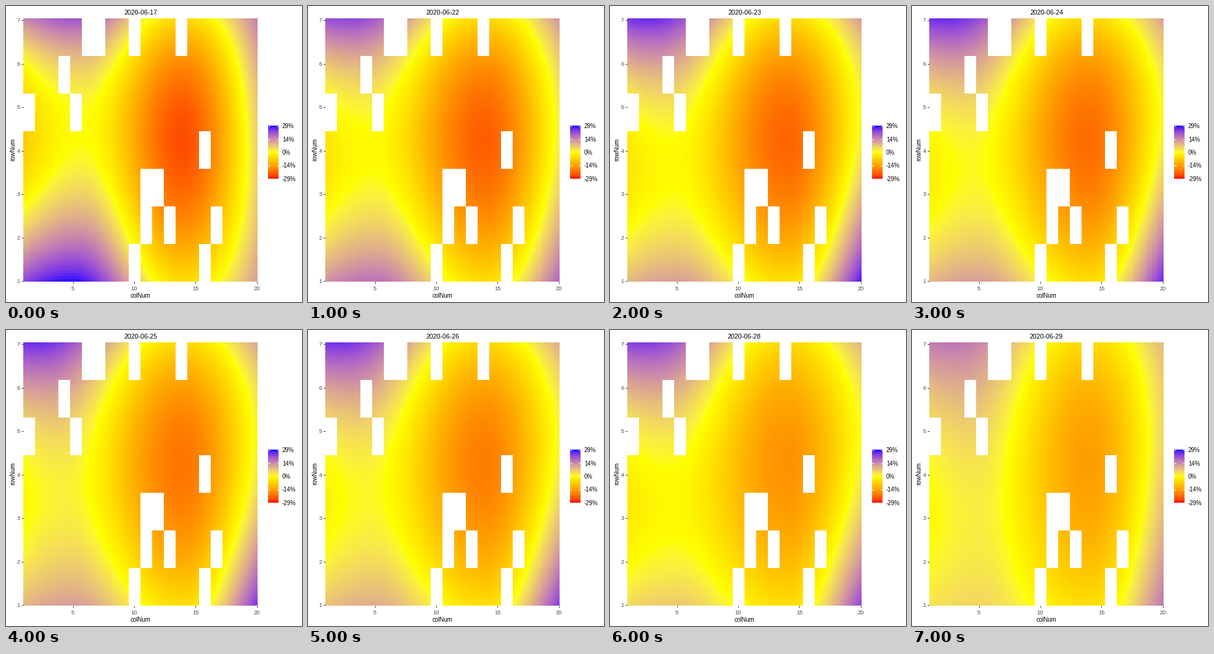
These frames come from a looping animation (480 by 480 pixels, 8 s). A matplotlib script:

```python
import numpy as np
import matplotlib.pyplot as plt
from matplotlib.animation import FuncAnimation
from matplotlib.patches import Rectangle

plt.rcParams["font.family"] = ["Liberation Sans", "DejaVu Sans"]

SIZE, DPI = 480, 72
LEFT, RIGHT, TOP, BOTTOM = 28, 408, 20, 447
LIMIT = 29.0
CELLS = 100
TROUGH_COL = 13.9

DAYS = [17, 22, 23, 24, 25, 26, 28, 29]

# Heights in percent on the days that steer the terrain: the western ridge at
# the north edge, its saddle and the south edge, then the eastern edge.
KEY_DAYS = [17, 22, 23, 25, 28, 29]
KEYS = {
    "north": [21, 23, 26, 26, 24, 17],
    "saddle": [0, -0.5, 0, 2.5, 0.3, 3.3],
    "south": [29, 17.5, 11.8, 12, 6.5, 5],
    "east": [6, 2.5, 2.5, 2.5, 1.8, 6],
    "southeast": [12, 19.5, 28, 25, 23, 17],
    "ridge_col": [5.2, 3, 2.8, 2, 2.5, 3],
}

# Empty plots as (column, row) counted from the top left of a 20 by 7 field.
GAPS = [(5, 0), (6, 0), (9, 0), (13, 0), (3, 1), (0, 2), (4, 2), (15, 3),
        (10, 4), (11, 4), (10, 5), (12, 5), (16, 5), (9, 6), (15, 6)]

WHITE_POINT = np.array([0.95047, 1.0, 1.08883])
RGB_TO_XYZ = np.array([[0.4124564, 0.3575761, 0.1804375],
                       [0.2126729, 0.7151522, 0.0721750],
                       [0.0193339, 0.1191920, 0.9503041]])


def rgb_to_lab(rgb):
    """Convert a pure 0/1 RGB colour to CIE Lab."""
    xyz = RGB_TO_XYZ @ np.array(rgb, float) / WHITE_POINT
    f = np.where(xyz > 0.008856, np.cbrt(xyz), 7.787 * xyz + 16 / 116)
    return np.array([116 * f[1] - 16, 500 * (f[0] - f[1]), 200 * (f[1] - f[2])])


def lab_to_rgb(lab):
    fy = (lab[..., 0] + 16) / 116
    f = np.stack([fy + lab[..., 1] / 500, fy, fy - lab[..., 2] / 200], axis=-1)
    xyz = np.where(f > 0.2069, f ** 3, (f - 16 / 116) / 7.787) * WHITE_POINT
    lin = np.clip(xyz @ np.linalg.inv(RGB_TO_XYZ).T, 0, 1)
    srgb = np.where(lin > 0.0031308, 1.055 * lin ** (1 / 2.4) - 0.055, 12.92 * lin)
    return np.clip(srgb, 0, 1)


RED, YELLOW, BLUE = (rgb_to_lab(c) for c in [(1, 0, 0), (1, 1, 0), (0, 0, 1)])


def colour(value):
    """Diverging red - yellow - blue ramp, blended in Lab."""
    t = np.clip(value / LIMIT, -1, 1)[..., None]
    end = np.where(t < 0, RED, BLUE)
    return lab_to_rgb(YELLOW + np.abs(t) * (end - YELLOW))


# Cell centres: columns 1..20 eastwards, v from 1 (north) to -1 (south).
step = (np.arange(CELLS) + 0.5) / CELLS
col = (1 + 19 * step)[None, :]
v = (1 - 2 * step)[:, None]
bent_v = v - 0.07 * (1 - v ** 2)  # moves the middle slightly north


def arc(north, middle, south):
    """Parabola from the north edge through the middle to the south edge."""
    return (middle + (north - south) / 2 * bent_v
            + ((north + south) / 2 - middle) * bent_v ** 2)


def terrain(day):
    key = {name: np.interp(day, KEY_DAYS, vals) for name, vals in KEYS.items()}
    age = day - DAYS[0]
    ridge = arc(key["north"], key["saddle"], key["south"])
    trough = arc(-5.6, -25 + 10 * (age / 12) ** 2, -5)
    east = arc(16 - 0.6 * age, key["east"], key["southeast"])

    # West: a cosine wave from ridge to trough, falling slower past the ridge.
    ridge_col = (key["ridge_col"] * (1 + v) + 4.9 * (1 - v)) / 2 + 0.8 * (1 - v ** 2)
    phase = np.pi * (col - ridge_col) / (TROUGH_COL - ridge_col)
    phase = np.where(phase < 0, 0.65 * phase, phase)
    west_part = trough + (ridge - trough) * (1 + np.cos(phase)) / 2

    # East: the first two thirds of the next rise.
    rise = 1 - np.cos(2 * np.pi / 3 * (col - TROUGH_COL) / (20 - TROUGH_COL))
    east_part = trough + (east - trough) * rise / 1.5
    return np.where(col < TROUGH_COL, west_part, east_part)


def date(day):
    return f"2020-06-{day}"


fig = plt.figure(figsize=(SIZE / DPI, SIZE / DPI), dpi=DPI, facecolor="white")
ax = fig.add_axes([0, 0, 1, 1])
ax.axis("off")


def label(x, y, text, size, color="black", **kw):
    style = dict(ha="center", va="baseline") | kw
    return ax.text(x, y, text, fontsize=size, color=color, **style)


def stroke(xs, ys, color, width=1):
    ax.plot(xs, ys, color=color, lw=width, solid_capstyle="butt")


heat = ax.imshow(colour(terrain(DAYS[0])), extent=(LEFT, RIGHT, BOTTOM, TOP),
                 interpolation="nearest", aspect="auto")
for c, r in GAPS:
    ax.add_patch(Rectangle((LEFT + 19 * c, TOP + 61 * r), 19, 61,
                           fc="white", ec="none", antialiased=False, zorder=2))

# Axes
for n in range(1, 8):
    y = 446 - 70.5 * (n - 1)
    stroke([25, 28], [y, y], "#333333")
    label(23, y + 3.2, str(n), 9.3, "#4d4d4d", ha="right")
for n in (5, 10, 15, 20):
    x = 108.5 + 19.87 * (n - 5)
    stroke([x, x], [447, 450], "#333333")
    label(x, 461, str(n), 9.3, "#4d4d4d")
label(218, 473, "colNum", 9.7)
label(16, 233, "rowNum", 9.9, rotation=90, ha="right", va="center")
title = label(218, 14, date(DAYS[0]), 10.6)

# Colour key
bar = colour(np.linspace(LIMIT, -LIMIT, 86))[:, None, :]
ax.imshow(bar, extent=(425, 442, 280, 194), interpolation="nearest", aspect="auto")
for i, text in enumerate(["29%", "14%", "0%", "-14%", "-29%"]):
    y = 194.5 + 21.4 * i
    stroke([425, 428.4], [y, y], "white")
    stroke([438.6, 442], [y, y], "white")
    label(448, y + 3.7, text, 9.5, ha="left")

ax.set_xlim(0, SIZE)
ax.set_ylim(SIZE, 0)


def draw(i):
    heat.set_data(colour(terrain(DAYS[i])))
    title.set_text(date(DAYS[i]))
    return heat, title


anim = FuncAnimation(fig, draw, frames=len(DAYS), interval=1000, repeat=True)
plt.show()
```
